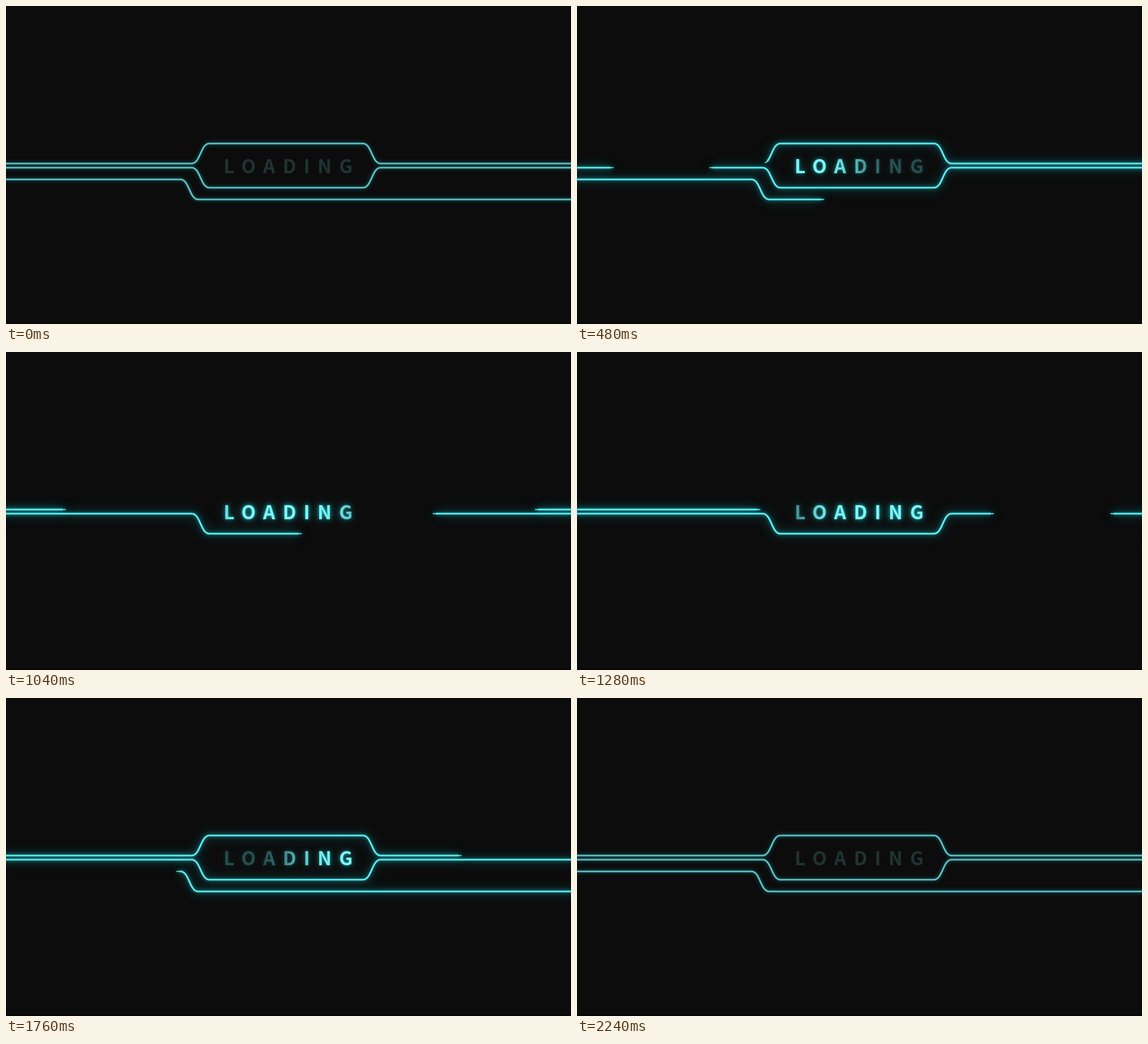
Animation, 960 px wide and 540 px high, one loop 2.4 s. Source, as an HTML page with a canvas:

```html
<!DOCTYPE html>
<html lang="en">
<head>
<meta charset="utf-8">
<title>Loading</title>
<style>
  html, body { margin: 0; width: 100%; height: 100%; overflow: hidden; background: #0c0c0c; }
  canvas { display: block; }
</style>
</head>
<body>
<canvas id="stage" width="960" height="540"></canvas>
<script>
const ctx = document.getElementById('stage').getContext('2d');
const LOOP = 2400, MOVE_END = 2240, STEP = 40;
const PAD = 40, FAR = 1200, TIP = 5;
const NEAR_EDGE = -10, FAR_EDGE = 1030;

const bend = (x, y0, y1) => `H${x}C${x + 15} ${y0} ${x + 15} ${y1} ${x + 30} ${y1}`;
const hexSide = (y0, y1) => new Path2D(`M${-PAD} ${y0}${bend(315, y0, y1)}${bend(606, y1, y0)}H1100`);

// A line is cut open by a gap: its left and right rims each travel
// across the stage once, between the given start and end times.
const lines = [
  { path: hexSide(267, 233), left: [748, 2188], right: [0, 1280] },
  { path: hexSide(274, 308), left: [220, 1840], right: [0, 1560] },
  { path: new Path2D(`M${-PAD} 294${bend(296, 294, 328)}H1100`),
    left: [0, 878], right: [1164, 2087], backward: true }
];

const mix = (a, b, u) => a + (b - a) * u;

function smooth(a, b, x) {
  const u = Math.min(1, Math.max(0, (x - a) / (b - a)));
  return u * u * (3 - 2 * u);
}

function rim([start, end], t, backward) {
  const u = smooth(start, end, t);
  return mix(NEAR_EDGE, FAR_EDGE, backward ? 1 - u : u);
}

function strokePart(path, from, to, width) {
  from = Math.max(from, -PAD);
  if (to <= from) return;
  ctx.lineWidth = width;
  ctx.setLineDash([to - from, 3000]);
  ctx.lineDashOffset = -(from + PAD);
  ctx.stroke(path);
}

function drawLine({ path, left, right, backward }, t, width) {
  const l = rim(left, t, backward), r = rim(right, t, backward);
  strokePart(path, -PAD, l - TIP, width);
  strokePart(path, l - TIP, l, width * 0.55);
  strokePart(path, r, r + TIP, width * 0.55);
  strokePart(path, r + TIP, FAR, width);
}

function drawLines(t, p) {
  ctx.save();
  ctx.translate(0.5, 0.5);
  ctx.strokeStyle = `rgba(35,${mix(120, 175, p)},${mix(125, 180, p)},0.6)`;
  for (const [blur, alpha] of [[6, mix(0.7, 1, p)], [18, p]]) {
    ctx.shadowBlur = blur;
    ctx.shadowColor = `rgba(20,205,215,${alpha})`;
    lines.forEach(line => drawLine(line, t, 3.4));
  }
  ctx.shadowColor = 'transparent';
  ctx.strokeStyle = `rgb(112,${mix(200, 246, p)},${mix(202, 246, p)})`;
  lines.forEach(line => drawLine(line, t, 2.1));
  ctx.restore();
}

// Light enters the word from the left and later leaves the same way.
const sweep = ms => 4.9 * ms ** 0.6;

function drawText(t, p) {
  const lit = 270 + sweep(t), fade = 700 - sweep(MOVE_END - t);
  const x0 = 360, x1 = 600, stops = 24, soft = 68;
  const fill = ctx.createLinearGradient(x0, 0, x1, 0);
  for (let i = 0; i <= stops; i++) {
    const x = mix(x0, x1, i / stops);
    const light = smooth(lit + soft, lit - soft, x) * smooth(fade - soft, fade + soft, x);
    fill.addColorStop(i / stops, `rgba(128,244,244,${mix(0.17, 1, light)})`);
  }
  ctx.save();
  ctx.font = 'bold 32px "Noto Sans CJK JP", "Noto Sans CJK SC", "Noto Sans CJK", "Noto Sans", sans-serif';
  ctx.letterSpacing = '12.8px';
  ctx.fillStyle = fill;
  for (const blur of [16, 6]) {
    ctx.shadowBlur = blur;
    ctx.shadowColor = `rgba(20,205,215,${0.9 * p * p})`;
    ctx.globalAlpha = blur > 10 ? 0.6 * p * p : 1;
    ctx.fillText('LOADING', 369.7, 284);
  }
  ctx.restore();
}

function draw(ms) {
  const t = Math.min(MOVE_END, Math.floor((ms % LOOP) / STEP) * STEP);
  const p = smooth(0, 600, t) * smooth(MOVE_END, MOVE_END - 600, t);
  ctx.fillStyle = '#0c0c0c';
  ctx.fillRect(0, 0, 960, 540);
  ctx.fillStyle = '#060606';
  ctx.fillRect(0, 538, 960, 2);
  drawLines(t, p);
  drawText(t, p);
}

const start = performance.now();
function tick() {
  draw(performance.now() - start);
  requestAnimationFrame(tick);
}
tick();
</script>
</body>
</html>
```
